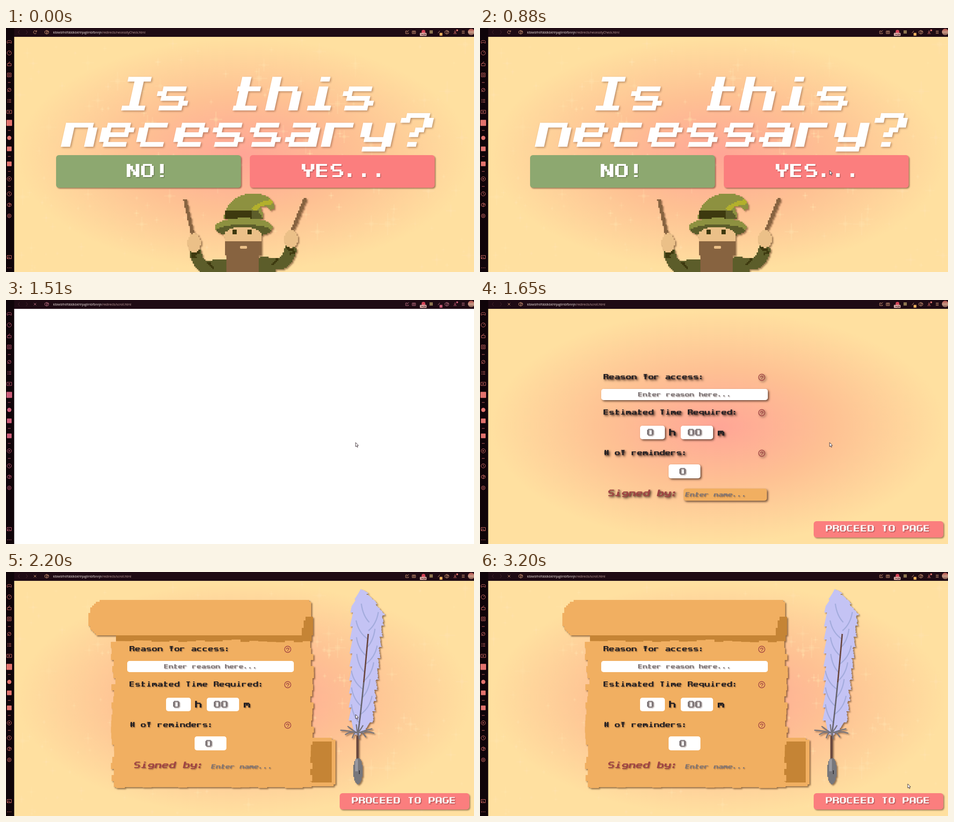
An HTML page with a canvas for the animation above (3.33 s loop, 1000 by 524 pixels).

```html
<!DOCTYPE html>
<html lang="en">
<head>
<meta charset="utf-8">
<title>Is this necessary?</title>
<style>
  html, body { margin: 0; width: 100%; height: 100%; overflow: hidden; background: #0e0408; }
  canvas { display: block; width: 100%; height: 100%; }
</style>
</head>
<body>
<canvas id="stage" width="1000" height="524"></canvas>
<script>
const W = 1000, H = 524, LOOP = 3330;
const PRESS = 1210, LEAVE = 1510, ARRIVE = 1650, LOADED = 1800;
const ctx = document.getElementById('stage').getContext('2d');

const PAPER = '#f1af61', FOLD = '#c58435', SALMON = '#fb7e7e', MAROON = '#a04343';
const INK = '#211e22', GREY = '#7d7577';

function random(seed) {
  return () => (seed = (seed * 16807) % 2147483647) / 2147483647;
}

function sprite(draw) {
  const cv = document.createElement('canvas');
  cv.width = W;
  cv.height = H;
  draw(cv.getContext('2d'));
  return cv;
}

function shade(c, color, offset, blur) {
  c.shadowColor = color;
  c.shadowOffsetX = c.shadowOffsetY = offset;
  c.shadowBlur = blur;
}

function stamp(image, color, offset, blur) {
  ctx.save();
  if (color) shade(ctx, color, offset, blur);
  ctx.drawImage(image, 0, 0);
  ctx.restore();
}

// ---- lettering ----
// Rows run a to h. One letter is a bar in that row; three letters are a stem: column, first row, last row.
const COLUMN = { l: 0, i: 1.5, c: 2.5, j: 3.5, r: 5 };
const GLYPH = {
  A: 'a e lbg rbg', C: 'a g lbf', D: 'a g lag rbf', E: 'a d g lag', G: 'a g lbf rdf', I: 'a g cbf',
  N: 'lag rag ibc cdd jef', O: 'a g lbf rbf', P: 'a e lag rbd', R: 'a d lag rbc reg', S: 'a d g lbc ref',
  T: 'a cbg', Y: 'd lac rac ceg',
  a: 'c e g rdg lff', b: 'c g lag rdf', c: 'c g ldf', d: 'c g rag ldf', e: 'c e g ldf rdd', f: 'a c cbg',
  g: 'c f h lde rdg', h: 'c lag rdg', i: 'g caa ccf', m: 'c lcg rdg cde', n: 'c lcg rdg', o: 'c g ldf rdf',
  q: 'c f lde rch', r: 'c lcg', s: 'c e g ldd rff', t: 'c g iaf', u: 'g lcf rcg', y: 'f h lce rcg',
  0: 'a g lbf rbf', '#': 'c e iag rag', '.': 'ifg', ':': 'icd ifg', '!': 'cae cgg', '?': 'a lbb rbc jdd cee cgg'
};
const row = ch => ch.charCodeAt(0) - 97;

function lettering(c, str, x, y, unit, color, slant = 0, shadow = ['rgba(60,30,20,.4)', 1.5, 2]) {
  const path = new Path2D();
  [...str].forEach((ch, i) => {
    for (const part of (GLYPH[ch] || '').match(/\w+/g) || []) {
      const [col, from, to] = part;
      if (to) path.rect(i * 8 + COLUMN[col], row(from) - 7, 2, row(to) - row(from) + 1);
      else path.rect(i * 8 + 1, row(part) - 7, 5, 1);
    }
  });
  c.save();
  shade(c, ...shadow);
  c.fillStyle = color;
  c.transform(unit, 0, -slant * unit, unit * 1.04, x, y);
  c.fill(path);
  c.restore();
}

// ---- shapes ----
function panel(c, x, y, w, h, r, color) {
  c.fillStyle = color;
  c.beginPath();
  c.roundRect(x, y, w, h, r);
  c.fill();
}

function button(x, y, w, h, color) {
  ctx.save();
  shade(ctx, 'rgba(70,30,15,.5)', 2, 3);
  panel(ctx, x, y, w, h, 6, color);
  ctx.restore();
}

function disc(c, x, y, r, color) {
  c.fillStyle = color;
  c.beginPath();
  c.arc(x, y, r, 0, 7);
  c.fill();
}

function ring(c, x, y, r, from = 0, to = 6.3) {
  c.beginPath();
  c.arc(x, y, r, from, to);
  c.stroke();
}

const line = (c, d) => c.stroke(new Path2D(d));

function shape(method, ...args) {
  const path = new Path2D();
  path[method](...args);
  return path;
}
const oval = (x, y, rx, ry, turn = 0) => shape('ellipse', x, y, rx, ry, turn, 0, 7);
const rect = (...box) => shape('rect', ...box);

// Returns a brush that fills a path, or its outline of the given width, with square cells.
function pixelBrush(c, x0, y0, x1, y1, cell) {
  return (color, path, width, clip) => {
    c.fillStyle = color;
    c.lineWidth = width || 1;
    for (let y = y0; y < y1; y += cell) {
      for (let x = x0; x < x1; x += cell) {
        const px = x + cell / 2, py = y + cell / 2;
        const hit = width ? c.isPointInStroke(path, px, py) : c.isPointInPath(path, px, py);
        if (hit && (!clip || c.isPointInPath(clip, px, py))) c.fillRect(x, y, cell, cell);
      }
    }
  };
}

// ---- pictures ----
const wizard = sprite(c => {
  const olive = '#8d9140', moss = '#5c5d2a', dark = '#3d390f', lime = '#b3b02c';
  const skin = '#ebc088', wood = '#876340';
  const paint = pixelBrush(c, 375, 344, 655, 524, 3);
  const mirror = new DOMMatrix([-1, 0, 0, 1, 1013, -8]);

  paint(moss, rect(440, 498, 135, 26));
  for (const side of [new DOMMatrix(), mirror]) {
    const place = path => {
      const out = new Path2D();
      out.addPath(path, side);
      return out;
    };
    paint(moss, place(new Path2D('M404 478 Q410 514 432 514 L472 512')), 25);
    paint(dark, place(oval(406, 482, 10, 5, -0.4)));
    paint(dark, place(new Path2D('M396 490 L408 493 M432 503 L444 517')), 5);
  }
  paint(wood, new Path2D('M382 367 L400 448 M640 365 L608 444'), 7);
  paint(skin, oval(402, 462, 14, 21));
  paint(skin, oval(609, 453, 15, 19));

  // the hat: discs shrinking along a curl
  const hat = new Path2D();
  const bezier = (t, a, b, d, e) => a * (1 - t) ** 3 + 3 * b * t * (1 - t) ** 2 + 3 * d * t * t * (1 - t) + e * t ** 3;
  for (let t = 0; t <= 1; t += 0.04) {
    const r = 34 * (1 - t) ** 2 + 8;
    hat.addPath(oval(bezier(t, 508, 500, 560, 567), bezier(t, 408, 372, 356, 386), r, r));
  }
  const aboveBrim = rect(375, 344, 280, 65);
  paint(olive, hat, 0, aboveBrim);
  paint(lime, new Path2D('M530 391 Q542 376 570 373'), 10, hat);
  paint(dark, rect(467, 391, 60, 18), 0, hat);
  paint(moss, new Path2D('M524 391 L538 391 L549 409 L524 409'));
  paint(olive, oval(508, 428, 62, 20));
  paint(moss, oval(508, 435, 58, 13));

  paint(skin, oval(506, 446, 40, 19));
  paint(skin, rect(467, 444, 78, 20));
  paint(wood, rect(467, 457, 78, 32));
  paint(wood, rect(471, 486, 70, 38));
  c.fillStyle = dark;
  for (const x of [484, 516]) c.fillRect(x, 433, 9, 10);
  panel(c, 500, 468, 15, 6, 2, skin);
});

const scroll = sprite(c => {
  const rnd = random(77);
  const paint = pixelBrush(c, 176, 60, 712, 464, 4);
  paint(PAPER, shape('roundRect', 640, 358, 64, 101, 9));
  paint(FOLD, shape('roundRect', 648, 364, 47, 88, 5));
  c.fillStyle = PAPER;
  c.fillRect(235, 140, 415, 317);
  for (let y = 150; y < 457; y += 13) {
    const left = 224 + rnd() * 10;
    c.fillRect(left, y, 649 + rnd() * 9 - left, 13);
  }
  for (let x = 235; x < 650; x += 19) c.fillRect(x, 450, 19, 8 + rnd() * 6);
  c.fillStyle = FOLD;
  for (let x = 235; x < 652; x += 19) c.fillRect(x, 136, 19, 9 + rnd() * 6);
  const roll = shape('roundRect', 177, 60, 476, 77, [36, 14, 0, 30]);
  paint(PAPER, roll);
  paint(FOLD, new Path2D('M640 96 H655 V137 H632 V126 Z'));
});

const feather = sprite(c => {
  const rnd = random(19);
  const shaft = y => 752 + 22 * (Math.max(0, 345 - y) / 212) ** 0.85;
  c.fillStyle = '#c4c3f4';
  for (let y = 37; y < 352; y += 2) {
    const k = (y - 37) / 315, end = Math.min(1, (1 - k) * 9);
    const left = 757 - 5 * k - Math.min(1, k * 9) * (15 * end + (y % 29) / 5);
    const right = 757 - 5 * k + Math.min(1, k * 6) ** 0.8 * (51 - 26 * k) * end + (y % 23) / 4;
    c.fillRect(left, y, right - left + rnd() * 2, 2);
  }
  c.lineWidth = 2.5;
  c.strokeStyle = '#a4acdd';
  for (let i = 0; i < 13; i++) {
    const y = 108 + i * 18, x = shaft(y), reach = (i % 2 ? 1 : -1) * (17 + i % 3 * 4);
    line(c, `M${x} ${y} q${reach * 0.8} -14 ${reach} -40`);
  }
  c.lineWidth = 3;
  for (let y = 133; y < 350; y += 4) {
    c.strokeStyle = y < 235 ? '#68443b' : '#66636c';
    line(c, `M${shaft(y)} ${y} L${shaft(y + 4)} ${y + 4}`);
  }
  c.lineWidth = 5;
  c.strokeStyle = '#69483f';
  line(c, 'M751 352 V404');
  c.lineWidth = 2.5;
  c.strokeStyle = '#77757d';
  for (let i = 0; i < 10; i++) {
    const a = i * 0.63 + 0.2, reach = 22 + rnd() * 18;
    line(c, `M751 346 q${Math.cos(a) * reach / 2} -6 ${Math.cos(a) * reach} ${Math.sin(a) * 16 - 3}`);
  }
  const paint = pixelBrush(c, 740, 400, 766, 458, 2);
  const nib = oval(752, 427, 10, 29);
  paint('#77777c', nib);
  paint('#9898a0', rect(746, 403, 6, 25), 0, nib);
  c.fillStyle = '#3a373d';
  c.fillRect(754, 426, 2, 8);
});

const stars = sprite(c => {
  const rnd = random(4211);
  for (let i = 0; i < 170; i++) {
    const x = 22 + rnd() * 972, y = 24 + rnd() * 495, s = 4 + rnd() * rnd() * 22;
    c.fillStyle = `rgba(255,226,175,${0.12 + rnd() * 0.16})`;
    c.fillRect(x - 1.5, y - s, 3, 2 * s);
    c.fillRect(x - s * 0.8, y - 1.5, s * 1.6, 3);
    c.fillRect(x - s / 4, y - s / 4, s / 2, s / 2);
  }
});

const form = sprite(c => {
  const field = (x, y, w, h, color = '#fff') => panel(c, x, y, w, h, 5, color);
  const heading = (str, y) => {
    lettering(c, str, 264, y, 1.5, INK);
    c.strokeStyle = MAROON;
    c.lineWidth = 1.4;
    ring(c, 602, y - 4, 6.7);
    ring(c, 602, y - 4, 2.8, Math.PI);
    line(c, `M604.5 ${y - 4} l-2.5 1.5`);
    disc(c, 602, y - 0.8, 0.9, MAROON);
  };
  heading('Reason for access:', 170);
  field(259, 191, 356, 24);
  lettering(c, 'Enter reason here...', 338, 207, 1.25, GREY);
  heading('Estimated Time Required:', 246);
  field(342, 270, 53, 29);
  field(429, 270, 69, 29);
  lettering(c, '0', 357, 291, 1.95, GREY);
  lettering(c, 'h', 404, 291, 1.95, INK);
  lettering(c, '00', 444, 291, 1.95, GREY);
  lettering(c, 'm', 508, 291, 1.95, INK);
  heading('# of reminders:', 333);
  field(403, 353, 68, 30);
  lettering(c, '0', 426, 375, 1.95, GREY);
  lettering(c, 'Signed by:', 272, 421, 1.89, MAROON, 0.23);
  field(435, 405, 178, 26, PAPER);
  lettering(c, 'Enter name...', 438, 422, 1.27, GREY, 0.23);
});

// ---- browser frame: icons are drawn around 0,0 ----
const ICONS = {
  pad: () => line(ctx, 'M-4 3 Q-6 -3 -2 -3 H2 Q6 -3 4 3 L2 1 H-2 Z'),
  dial() { ring(ctx, 0, 0, 4.5); line(ctx, 'M0 0 L2.5 -3'); },
  bag: () => line(ctx, 'M-4 -1 H4 V4 H-4 Z M-2 -1 L0 -4 H2'),
  chip() { line(ctx, 'M-4 -4 H4 V4 H-4 Z'); ring(ctx, 0, 0, 2); },
  pin() { ring(ctx, 0, 0, 3.6); line(ctx, 'M-4 4 L3 -3'); },
  list: () => line(ctx, 'M-4 -3 h2 m1 0 h5 M-4 0 h2 m1 0 h5 M-4 3 h2 m1 0 h5'),
  video: () => line(ctx, 'M-5 -3.5 H5 V3.5 H-5 Z M-1 -1.5 L1.5 0 L-1 1.5 Z'),
  play() { ring(ctx, 0, 0, 4.5); line(ctx, 'M-1 -1.5 L1.5 0 L-1 1.5 Z'); },
  square: tint => panel(ctx, -5, -5, 10, 10, 1, tint),
  active: tint => panel(ctx, -6, -6.5, 12, 13, 1, tint),
  dot: tint => disc(ctx, 0, 0, 4.5, tint),
  clock() { ring(ctx, 0, 0, 4.5); line(ctx, 'M0 -3 V0 L2 2'); },
  cube: () => line(ctx, 'M0 -4 L4 -2 V2 L0 4 L-4 2 V-2 Z L0 0 L4 -2 M0 0 V4'),
  gear() { ring(ctx, 0, 0, 4); ring(ctx, 0, 0, 1.6); },
  picture: () => line(ctx, 'M-4.5 -3.5 H4.5 V3.5 H-4.5 Z M-4 3 L-1 -1 L2 3'),
  more(tint) { for (const x of [-3.5, 0, 3.5]) disc(ctx, x, 0, 0.8, tint); },
  dash: () => line(ctx, 'M-3 0 H3'),
  back: () => line(ctx, 'M1.5 -4 L-1.5 0 L1.5 4'),
  next: () => line(ctx, 'M-1.5 -4 L1.5 0 L-1.5 4'),
  stop: () => line(ctx, 'M-2.5 -2.5 L2.5 2.5 M2.5 -2.5 L-2.5 2.5'),
  reload() { ring(ctx, 0, 0, 3.3, 0.5, 5.6); line(ctx, 'M3.5 -4 V-1 H0.5'); },
  edit: () => line(ctx, 'M1 -2.5 H-3 V3 H3 V1 M-1 1 L4 -4'),
  camera() { line(ctx, 'M-3.5 -2.5 H3.5 V3 H-3.5 Z'); ring(ctx, 0, 0, 1.5); },
  grid: () => panel(ctx, -3.5, -4, 7, 7, 0, '#8d7550'),
  wand: () => line(ctx, 'M-3 2 L1 -3'),
  save(tint) { line(ctx, 'M0 -4 V1 M-2.5 -1 L0 1.5 L2.5 -1 M-3.5 3 H3.5'); disc(ctx, 4.5, -4, 2, tint); },
  sliders: () => line(ctx, 'M-3 -2.5 H3 M-3 0 H3 M-3 2.5 H3')
};

function icon(name, x, y, tint) {
  ctx.save();
  ctx.translate(x, y);
  ctx.lineWidth = 0.9;
  ctx.strokeStyle = tint;
  ICONS[name](tint);
  ctx.restore();
}

function sidebar(tint) {
  ctx.fillStyle = '#0f0409';
  ctx.fillRect(0, 0, 17.5, H);
  let y = 30;
  for (const group of 'pad dial bag chip|pin list video active|dot square|square|play|clock cube gear'.split('|')) {
    if (y > 30) icon('dash', 7, y - 16, tint);
    for (const name of group.split(' ')) {
      icon(name, 7, y, tint);
      y += 23.6;
    }
    y += 8.6;
  }
  icon('picture', 7, 492, tint);
  icon('more', 7, 515, tint);
}

function toolbar(page, stage, tint, cream) {
  ctx.fillStyle = '#1f0b14';
  ctx.fillRect(17, 0, W, 19);
  icon('back', 27.5, 9, '#4a2832');
  icon('next', 44.5, 9, '#4a2832');
  icon(stage === 'ask' ? 'reload' : 'stop', 62, 9, cream);
  icon('cube', 87, 9, cream);

  const id = 'klbkebfnilfdddkbkhhjagilmbfbnnjn';
  ctx.font = '6.5px "Open Sans", "Noto Sans", sans-serif';
  ctx.fillStyle = '#f6e9e6';
  ctx.fillText(id, 100.5, 11.5);
  ctx.fillStyle = '#c9a5a2';
  ctx.fillText('/redirects/' + page + '.html', 100.5 + ctx.measureText(id).width, 11.5);

  icon('edit', 857, 9, cream);
  icon('camera', 871.5, 9, cream);
  disc(ctx, 892, 8, 4, '#d44558');
  panel(ctx, 884.5, 10.5, 14, 6.5, 1, '#f3c5bd');
  ctx.fillStyle = '#3a1018';
  ctx.font = 'bold 5px "Open Sans", sans-serif';
  ctx.fillText('1429', 886, 15.7);
  icon('grid', 908.5, 9, cream);
  icon('wand', 926, 9, cream);
  panel(ctx, 926.5, 10.5, 6, 6, 0, stage === 'blank' ? tint : '#f2b25f');
  icon('cube', 942, 9, cream);
  icon('save', 959.5, 9, tint);
  icon('sliders', 977, 9, cream);
  const photo = ctx.createLinearGradient(0, 2, 0, 16);
  ['#b4524c', '#c99a86', '#7c5148'].forEach((color, i) => photo.addColorStop(i / 2, color));
  disc(ctx, 994, 8.5, 7, photo);
}

// ---- pages ----
function backdrop() {
  ctx.save();
  ctx.translate(509, 272);
  ctx.scale(694, 357);
  const g = ctx.createRadialGradient(0, 0, 0, 0, 0, 1);
  g.addColorStop(0, '#ffa596');
  g.addColorStop(0.35, '#fec193');
  g.addColorStop(0.7, '#ffe0a0');
  ctx.fillStyle = g;
  ctx.fillRect(-1, -1, 2, 2);
  ctx.restore();
}

function askPage(pressed) {
  const soft = ['rgba(90,45,25,.4)', 2, 4];
  backdrop();
  stamp(stars);
  lettering(ctx, 'Is this', 236, 177, 9.92, '#fff', 0.23, soft);
  lettering(ctx, 'necessary?', 117, 255, 9.92, '#fff', 0.23, soft);
  button(107, 273, 395, 70, '#8da870');
  button(521, 273, 395, 70, pressed ? '#67282a' : SALMON);
  if (pressed) panel(ctx, 521, 276, 395, 67, 5, MAROON);
  lettering(ctx, 'NO!', 258, 320, 3.85, '#fff', 0, ['rgba(50,50,30,.4)', 1.5, 2]);
  lettering(ctx, 'YES...', 632, 320, 3.85, pressed ? INK : '#fff', 0, ['rgba(90,30,30,.4)', 1.5, 2]);
  stamp(wizard, 'rgba(80,45,20,.55)', 2.5, 3);
}

function formPage(loaded) {
  backdrop();
  if (loaded) {
    stamp(stars);
    stamp(scroll, 'rgba(80,45,15,.6)', 2.5, 3);
    stamp(feather, 'rgba(80,50,30,.6)', 2.5, 3);
    stamp(form);
  } else {
    stamp(form, 'rgba(50,25,15,.7)', 2.5, 4);
  }
  button(713, 475, 277, 35, SALMON);
  lettering(ctx, 'PROCEED TO PAGE', 739, 497, 1.865, '#fff', 0, ['rgba(90,30,30,.5)', 1.5, 2]);
}

// ---- pointer: in from the corner, onto the button, later towards the next one ----
function ease(t, from, to) {
  const k = Math.min(1, Math.max(0, (t - from) / (to - from)));
  return k * k * (3 - 2 * k);
}

function pointer(t) {
  if (t < 250) return;
  const enter = 1 - ease(t, 100, 800), go = ease(t, 2330, 3200);
  ctx.save();
  ctx.translate(747 + 160 * enter + 167 * go, 306 + 104 * enter + 149 * go);
  const arrow = new Path2D('M0 0 V9 L2 7.2 L3.4 10.3 L4.9 9.6 L3.6 6.6 L6 6.4 Z');
  ctx.fillStyle = '#fff';
  ctx.fill(arrow);
  ctx.strokeStyle = '#33222a';
  ctx.lineWidth = 0.9;
  ctx.stroke(arrow);
  ctx.restore();
}

function render(t) {
  const stage = t < LEAVE ? 'ask' : t < ARRIVE ? 'blank' : 'form';
  if (stage === 'ask') askPage(t >= PRESS);
  if (stage === 'form') formPage(t >= LOADED);
  if (stage === 'blank') {
    ctx.fillStyle = '#fff';
    ctx.fillRect(0, 0, W, H);
  }
  const tint = stage === 'blank' ? '#cb5d78' : '#e2736d';
  const cream = stage === 'blank' ? '#c9788c' : '#dfa27e';
  toolbar(stage === 'ask' ? 'necessityCheck' : 'scroll', stage, tint, cream);
  sidebar(tint);
  pointer(t);
}

const start = performance.now();
function loop() {
  render((performance.now() - start) % LOOP);
  requestAnimationFrame(loop);
}
loop();
</script>
</body>
</html>
```
